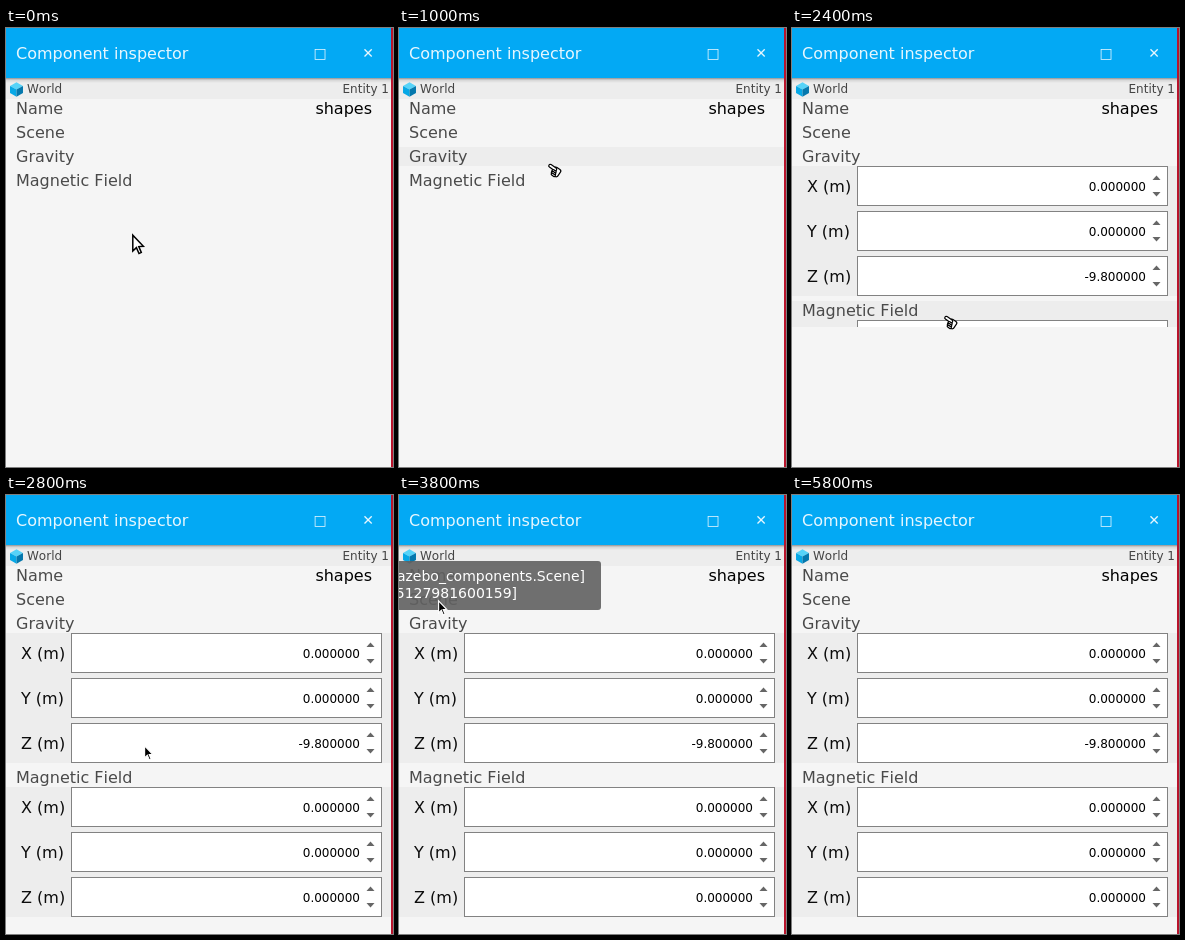
These frames come from a looping animation (387x439 px, 6 s). An HTML page with a canvas:

```html
<!DOCTYPE html>
<html lang="en">
<head>
<meta charset="utf-8">
<title>Component inspector</title>
<style>
  html, body { margin: 0; width: 100%; height: 100%; overflow: hidden; background: #f5f5f5; }
  canvas { display: block; }
</style>
</head>
<body>
<canvas id="stage" width="387" height="439"></canvas>
<script>
const W = 387, H = 439, LOOP = 6000, STEP = 100;
const BAR = 50, ROW = 19, GAP = 5, PITCH = ROW + GAP, FIELD = 40, LIST_TOP = 71;
const PANEL = 3 * FIELD + 2 * GAP;
const BG = '#f5f5f5', SHADE = '#ededed', ON_BAR = '#e6f6fe';
const ctx = document.getElementById('stage').getContext('2d');
ctx.fontKerning = 'none';

// Pointer moves; it rests between them
const home = { x: 126, y: 206 };
const moves = [
  { from: 0, to: 600, x: 148, y: 141 },
  { from: 700, to: 1000, x: 149, y: 135 },
  { from: 1700, to: 2300, x: 152, y: 287 },
  { from: 2600, to: 3100, x: 113, y: 181 },
  { from: 3100, to: 3500, x: 39, y: 105 },
  { from: 5000, to: 5100, x: 71, y: 110 },
  { from: 5100, to: 5400, x: 150, y: 22 }
];
const POINTER_GONE = 5500;

const progress = (t, from, to) => Math.min(1, Math.max(0, (t - from) / (to - from)));
const inOutQuad = k => k < 0.5 ? 2 * k * k : 1 - 2 * (1 - k) ** 2;
const smooth = k => k * k * (3 - 2 * k);

function pointerAt(t) {
  if (t >= POINTER_GONE) return null;
  let { x, y } = home;
  for (const m of moves) {
    const k = smooth(progress(t, m.from, m.to));
    x += (m.x - x) * k;
    y += (m.y - y) * k;
  }
  return { x: Math.round(x), y: Math.round(y) };
}

const panelHeight = (t, start) => Math.round(PANEL * inOutQuad(progress(t, start, start + 200)));

function rect(x, y, w, h, color) {
  ctx.fillStyle = color;
  ctx.fillRect(x, y, w, h);
}

function text(str, x, y, size, color, align = 'left') {
  ctx.font = size + 'px "DejaVu Sans", sans-serif';
  ctx.textAlign = align;
  ctx.fillStyle = color;
  ctx.fillText(str, x, y);
}

function poly(points, fill) {
  ctx.beginPath();
  points.forEach(([x, y]) => ctx.lineTo(x, y));
  ctx.closePath();
  ctx.fillStyle = fill;
  ctx.fill();
}

function pill(x, y, w, h, r) {
  ctx.beginPath();
  ctx.roundRect(x, y, w, h, r);
  ctx.fill();
  ctx.stroke();
}

function drawTitleBar() {
  const shadow = ctx.createLinearGradient(0, BAR, 0, BAR + 5);
  shadow.addColorStop(0, 'rgba(0,0,0,0.38)');
  shadow.addColorStop(0.4, 'rgba(0,0,0,0.1)');
  shadow.addColorStop(1, 'rgba(0,0,0,0)');
  rect(0, BAR, W, 5, shadow);
  rect(0, 0, W, BAR, '#03a9f4');
  text('Component inspector', 10, 31, 16, ON_BAR);
  text('□', 314, 30, 14, ON_BAR, 'center');
  text('✕', 362, 30, 14, ON_BAR, 'center');
}

function drawCube(x, y, r) {
  const h = r / 2, mid = [x, y];
  const top = [x, y - r], bottom = [x, y + r];
  const side = (dx, dy) => [x + dx * r * 0.9, y + dy * h];
  poly([top, side(1, -1), mid, side(-1, -1)], '#56d3f8');
  poly([side(-1, -1), mid, bottom, side(-1, 1)], '#06a8e6');
  poly([side(1, -1), mid, bottom, side(1, 1)], '#0578ad');
}

function drawEntityBar() {
  rect(0, BAR, W, LIST_TOP - BAR, SHADE);
  drawCube(10.5, 61.5, 7.2);
  text('World', 21, 65, 12, '#444');
  text('Entity 1', 383, 65, 12, '#444', 'right');
}

function drawRow(label, y, hovered) {
  if (hovered) rect(0, y, W, ROW, SHADE);
  text(label, 10, y + 15, 16, '#4a4a4a');
}

function drawSpin(y, dir) {
  poly([[360.5, y], [364.5, y + 4.5 * dir], [368.5, y]], '#666');
}

function drawField(label, value, y) {
  text(label, 15, y + 26, 16, '#0c0c0c');
  rect(65, y, 311, FIELD, '#828282');
  rect(66, y + 1, 309, FIELD - 2, '#fff');
  text(value, 354, y + 25, 12, '#000', 'right');
  drawSpin(y + 14, -1);
  drawSpin(y + 26, 1);
}

function drawPanel(y, height, vector) {
  if (!height) return;
  ctx.save();
  ctx.beginPath();
  ctx.rect(0, y, W, height);
  ctx.clip();
  rect(0, y, W, PANEL, SHADE);
  vector.forEach((v, i) => drawField('XYZ'[i] + ' (m)', v.toFixed(6), y + i * (FIELD + GAP)));
  ctx.restore();
}

function drawTooltip() {
  ctx.beginPath();
  ctx.roundRect(-20, 66, 222, 49, 3);
  ctx.fillStyle = 'rgba(97,97,97,0.9)';
  ctx.fill();
  text('gazebo_components.Scene]', 186, 86, 14, '#fff', 'right');
  text('5127981600159]', 118, 103, 14, '#fff', 'right');
}

function drawArrow(scale, fill, edge) {
  ctx.scale(scale, scale);
  ctx.strokeStyle = edge;
  ctx.lineWidth = 1.5;
  poly([[0.8, 1.2], [0.8, 17], [4.4, 13.6], [7, 19.6], [9.3, 18.5], [6.8, 12.6], [11.4, 12.3]], fill);
  ctx.stroke();
}

function drawHand() {
  ctx.translate(1, 2);
  ctx.rotate(0.6);
  ctx.fillStyle = '#fff';
  ctx.strokeStyle = '#000';
  ctx.lineWidth = 1.2;
  pill(6, -2.5, 7.5, 8.5, 2);
  pill(0, -1.5, 9, 3, 1.5);
  for (let i = 0; i < 3; i++) pill(5.5 + i * 0.7, 1.2 + i * 1.8, 4.5, 2, 1);
}

function drawPointer(p, t, overHeader) {
  ctx.save();
  ctx.translate(p.x, p.y);
  if (overHeader) drawHand();
  else if (t < 1000) drawArrow(1, '#fff', '#000');
  else drawArrow(0.76, '#000', '#fff');
  ctx.restore();
}

function draw(t) {
  const p = pointerAt(t);
  const gravity = panelHeight(t, 1180), magnetic = panelHeight(t, 2367);
  const gravityY = LIST_TOP + 2 * PITCH;
  const magneticY = gravityY + PITCH + gravity;
  const over = y => !!p && p.y + 2 >= y && p.y + 2 < y + ROW;
  const onGravity = over(gravityY), onMagnetic = over(magneticY);

  rect(0, 0, W, H, BG);
  drawEntityBar();
  drawTitleBar();
  drawRow('Name', LIST_TOP);
  text('shapes', 366, LIST_TOP + 15, 16, '#000', 'right');
  drawRow('Scene', LIST_TOP + PITCH);
  drawRow('Gravity', gravityY, onGravity);
  drawPanel(gravityY + ROW, gravity, [0, 0, -9.8]);
  drawRow('Magnetic Field', magneticY, onMagnetic);
  drawPanel(magneticY + ROW, magnetic, [0, 0, 0]);
  if (t >= 3800 && t < 5100) drawTooltip();
  rect(385, 0, 2, H, '#b8142c');
  if (p) drawPointer(p, t, onGravity || onMagnetic);
}

const start = performance.now();
function tick() {
  const t = (performance.now() - start) % LOOP;
  draw(Math.floor(t / STEP) * STEP);
  requestAnimationFrame(tick);
}
tick();
</script>
</body>
</html>
```
